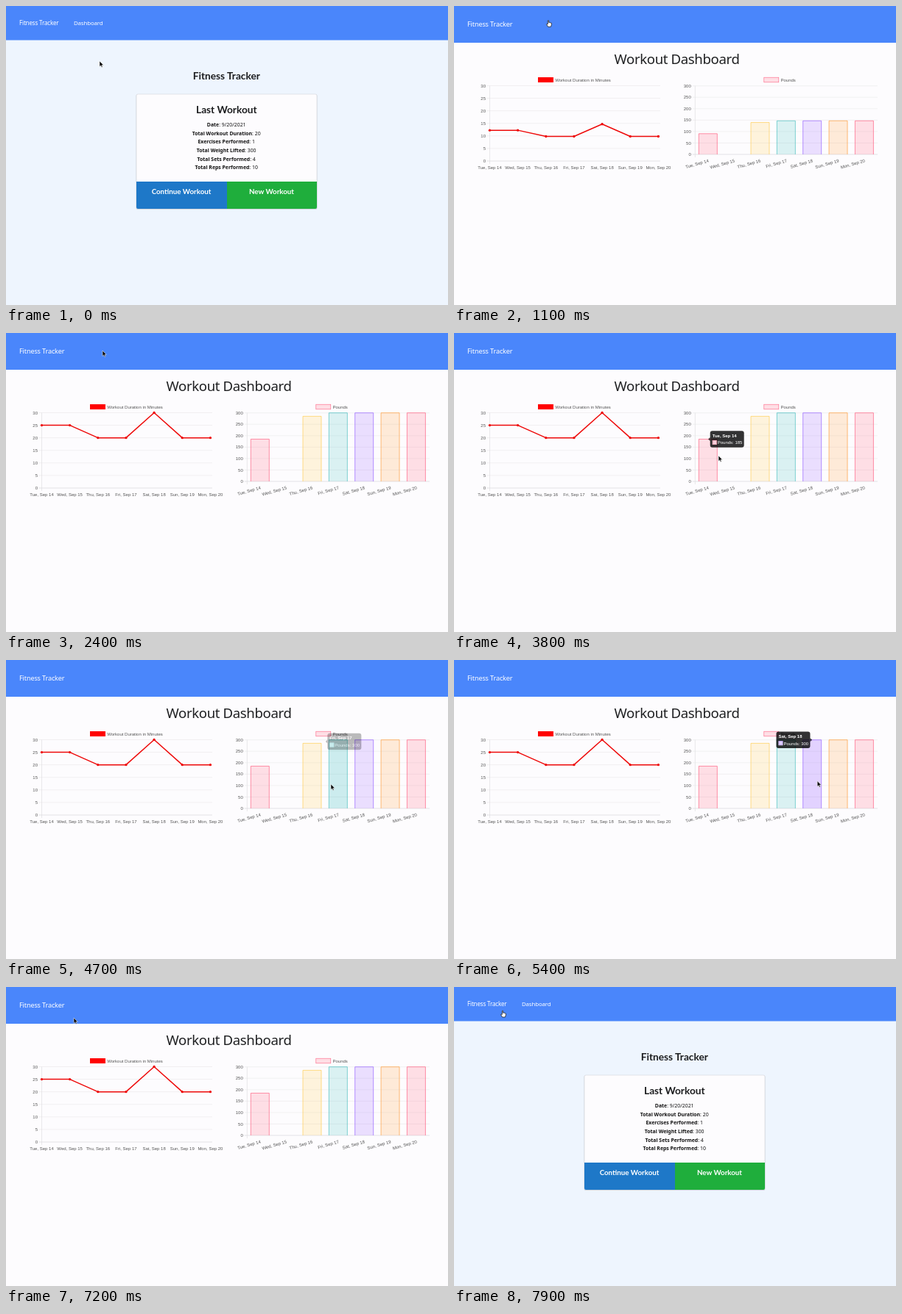
Write an HTML page that moves like this. It is 600 px wide and 407 px high and loops after 8 s.

```html
<!DOCTYPE html>
<html lang="en">
<head>
<meta charset="utf-8">
<title>Fitness Tracker</title>
<style>
  html, body { margin: 0; width: 100%; height: 100%; overflow: hidden; background: #fdfcfe; }
  svg { display: block; width: 100%; height: 100%; }
  text { white-space: pre; }
  .ui { font-family: "Noto Sans", "Open Sans", sans-serif; }
  .tight { letter-spacing: -.02em; }
  .lato { font-family: Lato, sans-serif; font-weight: 700; }
  .chart { font: 6px "Liberation Sans", Arial, sans-serif; fill: #555; }
  .mid { text-anchor: middle; }
  .end { text-anchor: end; }
  .bold { font-weight: 700; }
</style>
</head>
<body>
<svg id="stage" viewBox="0 0 600 407"></svg>
<script>
const LOOP = 8000, STEP = 100;
const TO_DASHBOARD = 800, CHART_START = 945, TO_HOME = 7500;

const DAYS = ['Tue, Sep 14', 'Wed, Sep 15', 'Thu, Sep 16', 'Fri, Sep 17', 'Sat, Sep 18', 'Sun, Sep 19', 'Mon, Sep 20'];
const MINUTES = [25, 25, 20, 20, 30, 20, 20];
const POUNDS = [185, 0, 285, 300, 300, 300, 300];
const RED = '255,99,132';
const TINTS = [RED, '54,162,235', '255,206,86', '75,192,192', '153,102,255', '255,159,64', RED];

// time, x, y
const PATH = [
  [0, 127, 75], [300, 127, 58], [600, 128, 20], [1300, 128, 19], [1700, 131, 24], [2700, 131, 24],
  [3300, 338, 156], [3600, 346, 166], [3800, 359, 167], [4300, 406, 171], [4700, 441, 169],
  [5200, 480, 166], [5700, 513, 163], [6200, 539, 161], [6400, 552, 160], [6700, 556, 155],
  [7200, 92, 42], [7400, 66, 32], [8000, 66, 32]
];
// time, hovered bar (-1 for none)
const HOVERS = [
  [3300, 0], [3800, -1], [4270, 2], [4450, -1], [4635, 3], [5020, -1], [5130, 4],
  [5490, -1], [5650, 5], [6100, -1], [6290, 6], [6720, -1]
];

const clamp = v => Math.min(1, Math.max(0, v));
const lerp = (a, b, k) => a + (b - a) * k;
const easeOut = k => 1 - (1 - clamp(k)) ** 4;

const minuteX = i => 48.5 + i * 38.15;
const minuteY = v => 211 - v * 3.417;
const barX = i => 344.8 + i * 35.35;
const poundY = v => 202 - v * .311;

function el(parent, tag, attrs = {}, text) {
  const node = document.createElementNS('http://www.w3.org/2000/svg', tag);
  set(node, attrs);
  if (text !== undefined) node.textContent = text;
  return parent.appendChild(node);
}
function set(node, attrs) {
  for (const key in attrs) node.setAttribute(key, attrs[key]);
}
const group = (parent, attrs) => el(parent, 'g', attrs);
const rect = (parent, x, y, width, height, fill, more) =>
  el(parent, 'rect', { x, y, width, height, fill, ...more });
const line = (parent, x1, y1, x2, y2, stroke, width = .6) =>
  el(parent, 'line', { x1, y1, x2, y2, stroke, 'stroke-width': width });
const label = (parent, x, y, text, cls, more) =>
  el(parent, 'text', { x, y, class: cls, ...more }, text);
const show = (node, on) => node.setAttribute('display', on ? 'inline' : 'none');

const stage = document.getElementById('stage');
const BLUE = '#4a86fb';

function makeHome() {
  const g = group(stage);
  rect(g, 0, 0, 600, 407, '#eef5fe');
  rect(g, 0, 0, 600, 46.5, BLUE);
  const nav = { fill: '#fff', 'font-size': 8 };
  label(g, 18, 26, 'Fitness Tracker', 'ui tight', nav);
  label(g, 92, 26, 'Dashboard', 'ui tight', { ...nav, 'font-size': 7.9 });

  const head = { fill: '#1c1d1f', 'font-size': 13.7 };
  label(g, 299.3, 99.7, 'Fitness Tracker', 'lato mid', head);
  rect(g, 176.6, 120.3, 245.8, 156.6, '#cbd2da', { rx: 2 });
  rect(g, 177, 120, 245, 156, '#fdfcfe', { rx: 2, stroke: '#d3d4d8', 'stroke-width': .6 });
  label(g, 299.3, 146.2, 'Last Workout', 'lato mid', head);

  const facts = [
    ['Date', '9/20/2021'], ['Total Workout Duration', 20], ['Exercises Performed', 1],
    ['Total Weight Lifted', 300], ['Total Sets Performed', 4], ['Total Reps Performed', 10]
  ];
  facts.forEach(([name, value], i) => {
    const row = label(g, 299.2, 163.8 + i * 11.72, '', 'ui mid', { fill: '#111', 'font-size': 6.9 });
    el(row, 'tspan', { class: 'bold' }, name);
    el(row, 'tspan', {}, ': ' + value);
  });

  el(g, 'path', { d: 'M177 239H300V276H179a2 2 0 0 1-2-2z', fill: '#1e78c8' });
  el(g, 'path', { d: 'M300 239H422V274a2 2 0 0 1-2 2H300z', fill: '#1fae3c' });
  const button = { fill: '#fff', 'font-size': 9.75 };
  label(g, 238, 255.6, 'Continue Workout', 'lato mid', button);
  label(g, 360.5, 255.6, 'New Workout', 'lato mid', button);
  return g;
}

function makeDashboard() {
  const g = group(stage);
  rect(g, 0, 0, 600, 407, '#fdfcfe');
  rect(g, 0, 0, 600, 50, BLUE);
  label(g, 18, 27.7, 'Fitness Tracker', 'ui tight', { fill: '#fff', 'font-size': 9.2 });
  label(g, 302.5, 79, 'Workout Dashboard', 'ui tight mid', { fill: '#1f2022', 'font-size': 18.6 });
  return g;
}

function makeAxes(g, left, right, max, step, toY) {
  for (let v = 0; v <= max; v += step) {
    const y = toY(v);
    line(g, left - 4, y, right, y, v ? '#e9e8ea' : '#d2d1d4');
    label(g, left - 5.5, y + 2.1, v, 'chart end');
  }
  line(g, left, toY(max), left, toY(0) + 4, '#dcdbde');
}

function makeLineChart(parent) {
  const g = group(parent);
  makeAxes(g, 48.5, 280, 30, 5, minuteY);
  rect(g, 114, 97, 21, 7, '#f00');
  label(g, 137.2, 102.8, 'Workout Duration in Minutes', 'chart');
  DAYS.forEach((day, i) => label(g, minuteX(i), 222, day, 'chart mid'));
  const curve = el(g, 'polyline', { fill: 'none', stroke: '#ee0a0a', 'stroke-width': 1.5, 'stroke-linejoin': 'round' });
  const dots = MINUTES.map((_, i) => el(g, 'circle', { cx: minuteX(i), r: 1.7, fill: '#ee0a0a' }));
  return k => {
    const ys = MINUTES.map(v => minuteY(v * k));
    set(curve, { points: ys.map((y, i) => minuteX(i) + ',' + y).join(' ') });
    dots.forEach((dot, i) => set(dot, { cy: ys[i] }));
  };
}

function makeBarChart(parent) {
  const g = group(parent);
  makeAxes(g, 327.3, 575, 300, 50, poundY);
  rect(g, 420.8, 97.2, 20, 6.6, `rgba(${RED},.2)`, { stroke: `rgb(${RED})`, 'stroke-width': .6 });
  label(g, 443.5, 102.8, 'Pounds', 'chart');
  DAYS.forEach((day, i) => {
    const x = barX(i) + 1.3;
    label(g, x, 212.3, day, 'chart end', { transform: `rotate(-16 ${x} 212.3)` });
  });
  const bars = TINTS.map(tint => el(g, 'path', { stroke: `rgb(${tint})`, 'stroke-width': .7 }));
  return (k, hovered) => bars.forEach((bar, i) => {
    const x = barX(i) - 12.5, y = poundY(POUNDS[i] * k);
    show(bar, POUNDS[i] > 0);
    set(bar, { d: `M${x} 202V${y}h25V202`, fill: `rgba(${TINTS[i]},${i === hovered ? .28 : .2})` });
  });
}

const TIP_W = 46, TIP_H = 22.5;
function makeTooltip(parent) {
  const g = group(parent);
  const caret = el(g, 'path', { fill: 'rgba(0,0,0,.8)' });
  rect(g, 0, 0, TIP_W, TIP_H, 'rgba(0,0,0,.8)', { rx: 3 });
  const white = { style: 'fill:#fff' };
  const title = label(g, 3, 8.6, '', 'chart bold', white);
  rect(g, 3, 12.8, 6, 6, '#fff');
  const swatch = rect(g, 3.5, 13.3, 5, 5);
  const body = label(g, 10, 18.2, '', 'chart', white);
  return ({ bar, x, y, opacity }) => {
    show(g, opacity > 0);
    if (opacity <= 0) return;
    set(g, { transform: `translate(${x} ${y})`, opacity });
    const c = TIP_H / 2;
    set(caret, { d: bar < 4 ? `M0 ${c - 2.5}l-2.5 2.5 2.5 2.5z` : `M${TIP_W} ${c - 2.5}l2.5 2.5-2.5 2.5z` });
    title.textContent = DAYS[bar];
    body.textContent = 'Pounds: ' + POUNDS[bar];
    set(swatch, { fill: `rgba(${TINTS[bar]},.3)`, stroke: `rgb(${TINTS[bar]})`, 'stroke-width': .4 });
  };
}

// Bars in the left half get the box on their right, the others on their left.
const tipPlace = bar => ({
  x: barX(bar) + (bar < 4 ? 2.9 : -2.9 - TIP_W),
  y: poundY(POUNDS[bar]) - TIP_H / 2
});

// Position eases for 400 ms and opacity fades for 200 ms, both from wherever they were.
function tipAt(t) {
  let hovered = -1, bar = 0, since = 0, base = 0;
  let from = tipPlace(0), goal = from, moved = -1e4;
  const opacityAt = time => clamp(base + (time - since) / 200 * (hovered < 0 ? -1 : 1));
  const placeAt = time => {
    const k = easeOut((time - moved) / 400);
    return { x: lerp(from.x, goal.x, k), y: lerp(from.y, goal.y, k) };
  };
  for (const [time, next] of HOVERS) {
    if (time > t) break;
    base = opacityAt(time);
    since = time;
    hovered = next;
    if (next >= 0) {
      from = placeAt(time);
      goal = tipPlace(next);
      moved = time;
      bar = next;
    }
  }
  return { hovered, bar, opacity: opacityAt(t), ...placeAt(t) };
}

function makeCursor() {
  const g = group(stage);
  const arrow = el(g, 'path', {
    d: 'M0 0V7.4L1.7 5.9 2.9 8.5 4.1 8 3 5.4H5.4Z',
    fill: '#0b0b0b', stroke: '#fff', 'stroke-width': .5
  });
  const hand = el(g, 'path', {
    d: 'M-.7 .6Q0-.5.7.6V3.3Q1.4 2.7 2 3.5 2.7 3 3.2 3.8 4.4 3.4 4.5 4.8L4 7.3 3.4 9H-.4L-2.5 5.6Q-2.3 4.4-.7 5.5Z',
    fill: '#fff', stroke: '#161616', 'stroke-width': .75, 'stroke-linejoin': 'round'
  });
  return t => {
    const i = Math.max(1, PATH.findIndex(p => p[0] > t));
    const [t0, x0, y0] = PATH[i - 1], [t1, x1, y1] = PATH[i];
    const k = (t - t0) / (t1 - t0);
    set(g, { transform: `translate(${lerp(x0, x1, k)} ${lerp(y0, y1, k)})` });
    const pointing = (t >= 500 && t < 1400) || t >= 7300;
    show(hand, pointing);
    show(arrow, !pointing);
  };
}

const home = makeHome();
const dashboard = makeDashboard();
const charts = group(dashboard);
const drawLine = makeLineChart(charts);
const drawBars = makeBarChart(charts);
const drawTip = makeTooltip(charts);
const drawCursor = makeCursor();

function render(t) {
  const onDashboard = t >= TO_DASHBOARD && t < TO_HOME;
  show(home, !onDashboard);
  show(dashboard, onDashboard);
  show(charts, t >= CHART_START);
  const grow = easeOut((t - CHART_START) / 1000);
  const tip = tipAt(t);
  drawLine(grow);
  drawBars(grow, tip.hovered);
  drawTip(tip);
  drawCursor(t);
}

const start = performance.now();
function tick() {
  const t = (performance.now() - start) % LOOP;
  render(Math.floor(t / STEP) * STEP);
  requestAnimationFrame(tick);
}
tick();
</script>
</body>
</html>
```
